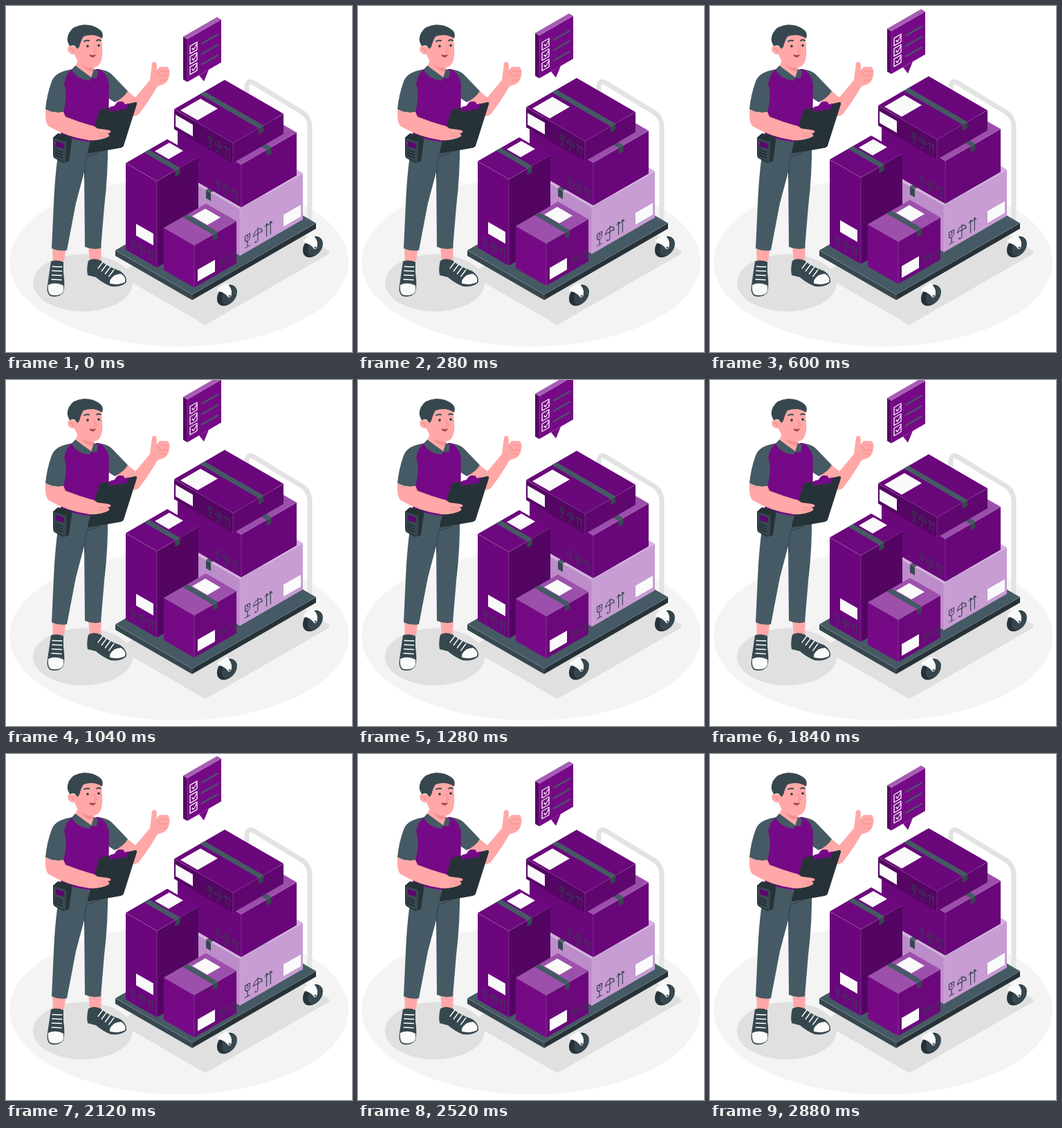
An HTML page for the animation above (2920 ms loop, 500 by 500 pixels).

```html
<!DOCTYPE html>
<html lang="en">
<head>
<meta charset="utf-8">
<title>Packing the cart</title>
<style>
html, body { margin: 0; height: 100%; overflow: hidden; background: #fff; }
svg { display: block; width: 100vw; height: 100vh; }
.skin { fill: #ffa8a7; }
.slate { fill: #455a64; }
.dark { fill: #263238; }
.mid { fill: #37474f; }
.purple { fill: #760a86; }
.white { fill: #fafafa; }
.line { fill: none; stroke-linecap: round; stroke-linejoin: round; }
.dash { fill: none; }
</style>
</head>
<body>
<svg viewBox="0 0 500 500">
  <defs>
    <g id="icons" class="line" stroke="#37404f">
      <path d="M-3-8H3V-4Q3 0 0 0Q-3 0-3-4ZM0 0V7M-3 7H3M-1-8L1-5L-1-3"/>
      <path d="M7.500-1Q8-7 13-7Q18-7 18.500-1Q16-3 13-1Q10-3 7.500-1ZM13-9V6Q13 8 11 8Q9.500 8 9.500 6"/>
      <path d="M24 8V-8M22-5L24-8L26-5M29 8V-8M27-5L29-8L31-5"/>
    </g>
    <g id="caster">
      <ellipse cx="443" cy="348" rx="12" ry="17" transform="rotate(38 443 348)" class="dark"/>
      <ellipse cx="447" cy="348" rx="9.500" ry="14.500" transform="rotate(30 447 348)" class="mid"/>
      <path d="M430 338L443 330Q451 338 450 346Q449 353 445 351Q441 344 430 342Z" class="white"/>
      <circle cx="447" cy="349" r="1.500" class="slate"/>
    </g>
  </defs>

  <ellipse cx="250" cy="370" rx="245" ry="122" fill="#f4f4f4"/>
  <ellipse cx="111" cy="400" rx="72" ry="41.500" fill="#e0e0e0"/>
  <path d="M288 461L174 395V380L350 280L467 354V358Z" fill="#e0e0e0"/>

  <path class="line" d="M439 312V176Q439 160 427 153L361 113Q348 104 348 118V140" stroke="#e3e3e3" stroke-width="7"/>
  <use href="#caster"/>
  <use href="#caster" x="-124" y="70"/>
  <g id="cart"></g>
  <g id="load"></g>

  <!-- legs and shoes -->
  <path class="skin" d="M67 348H87L83 374H68ZM119 346H138L137 370H121Z"/>
  <path class="slate" d="M78 188L147 192Q148 240 142 290L137 350Q126 353 114 348L113 240L101 285L88 353Q76 355 66 350L69 285Q71 240 76 210Z"/>
  <path class="line" d="M117 216Q113 232 114 248M117 217Q128 216 134 210" stroke="#37474f" stroke-width="1.500"/>
  <path class="mid" d="M65 369Q74 366 83 370V385Q86 407 82 415Q75 422 64 419Q58 415 60 403Z"/>
  <path class="white" d="M61 403Q72 398 83 404Q84 413 80 416Q72 420 64 417Q60 413 61 403Z"/>
  <path class="dash" d="M74 376L73 398" stroke="#fff" stroke-width="15" stroke-dasharray="1.500 4.700"/>
  <path class="mid" d="M119 368Q127 363 137 368Q147 377 165 383Q175 390 174 399Q167 407 151 405Q139 400 130 392L118 389Q116 380 119 368Z"/>
  <path class="white" d="M150 397Q155 387 166 387Q174 391 172 399Q163 404 150 401Z"/>
  <path class="dash" d="M136 374L156 389" stroke="#fff" stroke-width="13" stroke-dasharray="1.500 5"/>

  <!-- arms and body -->
  <path class="skin" d="M159 137L176 123L187 132L208 107L211 83Q213 79 217 82Q219 88 217 94L222 88L233 88Q238 92 236 99Q235 109 228 113L219 116Q205 140 192 156Q186 162 178 157Z"/>
  <path class="line" d="M217 95Q222 96 222 101M224 94L234 95M223 101L235 101M222 107L232 107" stroke="#f28f8f" stroke-width="1.200"/>
  <path class="slate" d="M130 91Q148 92 155 101L176 123Q170 133 157 139L140 128Z"/>
  <path class="slate" d="M99 91Q71 94 66 109Q59 128 57 149Q68 156 84 153L95 120Z"/>
  <path class="purple" d="M97 90L112 94L134 91Q146 97 149 112L148 195Q113 200 79 186L82 157Q90 130 84 112Q87 96 97 90Z"/>
  <path class="skin" d="M104 78L126 84L129 97Q126 103 123 104Q111 101 100 88Z"/>
  <path class="slate" d="M100 86L123 103L121 108L111 106Q99 101 95 92ZM127 91L133 94L131 104L123 104Z"/>
  <path d="M108 84Q116 90 125 89L126 95Q114 94 108 84Z" fill="#f28f8f"/>

  <!-- head -->
  <path class="skin" d="M101 45Q118 34 137 43Q140 60 139 73Q137 88 126 89Q113 89 103 79L99 70Q89 70 89 61Q92 54 99 59Z"/>
  <path class="mid" d="M92 58Q86 49 91 39Q97 28 113 27Q126 27 134 33Q142 38 139 47Q127 39 112 44Q108 50 106 59L103 62Q99 54 92 58Z"/>
  <path class="line" d="M113 51Q116 49 120 50M131 50Q134 48 137 50" stroke="#37474f" stroke-width="2"/>
  <path class="line" d="M93 62Q96 61 97 66M127 58L131 66L127 67" stroke="#f28f8f" stroke-width="1.400"/>
  <circle cx="118" cy="58" r="1.800" class="dark"/>
  <circle cx="134" cy="57" r="1.800" class="dark"/>
  <path d="M120 70Q125 72 130 70Q128 75 124 74Q121 73 120 70Z" fill="#a5424a"/>

  <!-- scanner and clipboard -->
  <path class="dark" d="M68 190L75 184L94 188Q96 190 95 195L91 224L83 227L70 220Q68 218 68 214Z"/>
  <path class="mid" d="M69 191L87 196Q88 200 86 226L70 219Z"/>
  <path d="M72 195L84 199V206L72 203Z" fill="#5c0770"/>
  <path class="line" d="M72 208L83 212M72 212L83 216M72 216L83 220" stroke="#1b252b" stroke-width="2" stroke-dasharray="1 3"/>
  <path class="skin" d="M57 149Q69 156 83 153L86 160L119 172L121 194Q89 190 62 174Q56 170 57 149Z"/>
  <path class="dark" d="M135 150L187 139Q190 139 189 142L170 202Q169 204 166 205L120 213Q117 213 118 210Z"/>
  <path class="purple" d="M150 146L157 144Q160 137 166 138Q172 138 171 142L178 141L174 149L149 153Z"/>
  <path class="skin" d="M108 168L121 172Q128 173 132 177L147 179Q153 180 151 183L147 184Q151 187 148 189Q136 195 121 194L105 190Z"/>
  <path class="line" d="M134 184H147M134 188H147" stroke="#f28f8f"/>

  <g id="bubble"></g>
</svg>
<script>
const SLOPE = Math.tan(Math.PI / 6);
const $ = id => document.getElementById(id);
const rect = (x, y, w, h, fill) => `<rect x="${x}" y="${y}" width="${w}" height="${h}" fill="${fill}"/>`;
const face = (a, b, c, d, x, y, content) =>
  `<g transform="matrix(${a} ${b} ${c} ${d} ${x} ${y})">${content}</g>`;
const label = (x, y, w = 25, h = 17) => rect(x, y, w, h, '#fafafa');
const icons = (x, y, scale = 1) => `<use href="#icons" transform="translate(${x} ${y}) scale(${scale})"/>`;

// Isometric box: x, y is its near top corner; w runs to the left, d to the right.
// Each face has its own flat coordinates for whatever is printed on it.
function box({ x, y, w, d, h, colors, top = '', left = '', right = '' }) {
  const lx = x - w, ly = y - w * SLOPE;
  return face(1, SLOPE, 1, -SLOPE, lx, ly, rect(0, 0, w, d, colors[0]) + top) +
    face(1, SLOPE, 0, 1, lx, ly, rect(0, 0, w, h, colors[1]) + left) +
    face(1, -SLOPE, 0, 1, x, y, rect(0, 0, d, h, colors[2]) + right) +
    `<path class="line" d="M${lx} ${ly}L${x} ${y}l${d} ${-d * SLOPE}M${x} ${y}v${h}" stroke="#fff" stroke-opacity=".2" stroke-width=".8"/>`;
}

// Parcel with a strip of tape over the top that folds down on the right face
function parcel({ tape = (b => (b.d - 7) / 2), ...b }) {
  const at = tape(b);
  return box({
    ...b,
    top: rect(0, at, b.w, 7, '#455a64') + (b.top || ''),
    right: rect(at, 0, 7, 9, '#37474f') + (b.right || '')
  });
}

$('cart').innerHTML = box({ x: 269, y: 417, w: 111, d: 179, h: 8, colors: ['#455a64', '#37474f', '#263238'] });

$('load').innerHTML =
  box({
    x: 338, y: 294, w: 91, d: 91, h: 67, colors: ['#d3b2dc', '#bd8cca', '#c79dd3'],
    top: rect(42, 0, 7, 91, '#455a64'), left: rect(42, 0, 7, 12, '#37474f'),
    right: label(63, 44) + icons(11, 52, 1.15)
  }) +
  parcel({
    x: 340, y: 229, w: 92, d: 80, h: 62, colors: ['#9b4fab', '#6a077b', '#69077a'],
    left: icons(58, 50, .95)
  }) +
  parcel({
    x: 328, y: 198, w: 85, d: 73, h: 29, colors: ['#6a077b', '#550563', '#5f076f'],
    tape: () => 37, top: label(6, 3, 25, 29), left: label(2, 7) + icons(52, 18, .95)
  }) +
  parcel({
    x: 218, y: 253, w: 45, d: 60, h: 125, colors: ['#6d087e', '#6c067e', '#540562'],
    top: label(6, 36, 20, 21), left: label(15, 79) + icons(11, 113, .95)
  }) +
  parcel({
    x: 272, y: 346, w: 44, d: 61, h: 61, colors: ['#9c50ab', '#760a86', '#6c087b'],
    top: label(6, 35, 22, 19), right: label(5, 38) + icons(39, 49, .64)
  });

const row = i => `<g class="line" stroke="#fff" stroke-width="1.300" transform="translate(0 ${12.5 + 15 * i})">
  <path d="M4 0H14V11H4ZM7 5L9 8L14 2"/>
  <path d="M21 6H44" stroke="#455a64" stroke-width="2.500"/></g>`;
$('bubble').innerHTML = box({
  x: 262, y: 48, w: 6, d: 49, h: 62, colors: ['#a65db4', '#570666', '#760a86'],
  right: '<path class="purple" d="M17 62L24 75L31 62Z"/>' + [0, 1, 2].map(row).join('')
});

const LOOP = 2920;
const start = performance.now();
function move(id, y) {
  $(id).setAttribute('transform', `translate(0 ${y})`);
}
function draw(now) {
  const t = Math.max(0, now - start) % LOOP;
  const phase = (t + 60) % LOOP / LOOP;
  move('bubble', 1 - 28 * (1 - Math.abs(1 - 2 * phase)));
  move('load', 4.5 * Math.cos(2 * Math.PI * (t - 2350) / LOOP) - 1.5);
  requestAnimationFrame(draw);
}
draw(start);
</script>
</body>
</html>
```
